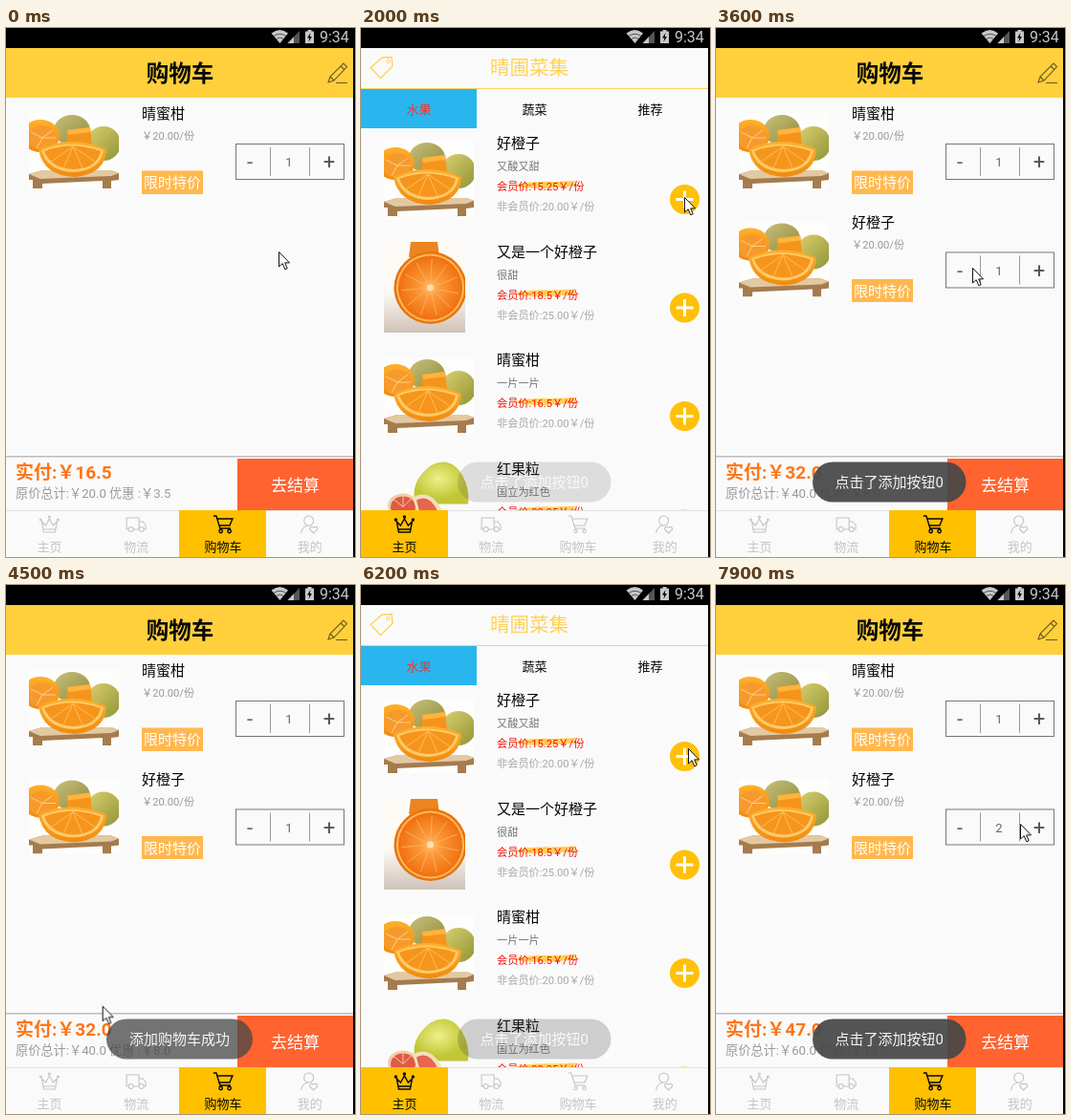
An HTML page for the animation above (8 s loop, 365 by 554 pixels).

```html
<!DOCTYPE html>
<html lang="zh-CN">
<head>
<meta charset="utf-8">
<title>购物车</title>
<style>
html, body { margin: 0; width: 100%; height: 100%; overflow: hidden; background: #000; }
svg { display: block; width: 365px; height: 554px; }
text { font-family: Roboto, "Noto Sans CJK SC", "Noto Sans CJK", sans-serif; white-space: pre; }

.step { animation: 8s step-end infinite; }
.home { animation-name: home; }
.cart { animation-name: cart; }
.tab-home { animation-name: tab-home; }
.tab-cart { animation-name: tab-cart; }
.sum1 { animation-name: sum1; }
.sum2 { animation-name: sum2; }
.sum3 { animation-name: sum3; }
.second { animation-name: second; }
@keyframes home { 0% { opacity: 0 } 12.4% { opacity: 1 } 39.9% { opacity: 0 } 63.65% { opacity: 1 } 91.15% { opacity: 0 } }
@keyframes cart { 0% { opacity: 1 } 12.4% { opacity: 0 } 39.9% { opacity: 1 } 63.65% { opacity: 0 } 91.15% { opacity: 1 } }
@keyframes tab-home { 0% { opacity: 0 } 12.4% { opacity: 1 } 38.65% { opacity: 0 } 63.65% { opacity: 1 } 89.9% { opacity: 0 } }
@keyframes tab-cart { 0% { opacity: 1 } 12.4% { opacity: 0 } 38.65% { opacity: 1 } 63.65% { opacity: 0 } 89.9% { opacity: 1 } }
@keyframes sum1 { 0% { opacity: 1 } 30% { opacity: 0 } }
@keyframes sum2 { 0% { opacity: 0 } 30% { opacity: 1 } 80% { opacity: 0 } }
@keyframes sum3 { 0% { opacity: 0 } 80% { opacity: 1 } }
@keyframes second { 0% { opacity: 0 } 30% { opacity: 1 } }

.toast { animation: 8s linear infinite; }
.clicked { animation-name: clicked; }
.added { animation-name: added; }
@keyframes clicked {
  0%, 24.2% { opacity: 0 } 28.9%, 49.9% { opacity: 1 } 52.5%, 76.2% { opacity: 0 } 81.2%, 100% { opacity: 1 }
}
@keyframes added { 0%, 53% { opacity: 0 } 57%, 73.8% { opacity: 1 } 76.2%, 100% { opacity: 0 } }

.cursor { animation: cursor 8s ease-in-out infinite; }
@keyframes cursor {
  0% { transform: translate(285px, 234px) }
  10%, 11.25% { transform: translate(50px, 526px) }
  22.5%, 25% { transform: translate(338px, 177px) }
  35% { transform: translate(236px, 518px) }
  36.25%, 37.5% { transform: translate(236px, 520px) }
  45% { transform: translate(268px, 251px) }
  48.75% { transform: translate(250px, 142px) }
  60%, 62.5% { transform: translate(56px, 530px) }
  63.75% { transform: translate(109px, 432px) }
  73.75%, 77.5% { transform: translate(342px, 171px) }
  85% { transform: translate(262px, 489px) }
  88.75%, 90% { transform: translate(237px, 527px) }
  96.25% { transform: translate(272px, 314px) }
  98.75%, 100% { transform: translate(318px, 250px) }
}
</style>
</head>
<body>
<svg id="stage" viewBox="0 0 365 554">
  <defs>
    <linearGradient id="pear" x2="1" y2="1">
      <stop stop-color="#c9c07a"/><stop offset="1" stop-color="#8d8a3c"/>
    </linearGradient>
    <linearGradient id="lime" x2="1" y2="1">
      <stop stop-color="#dcd070"/><stop offset="1" stop-color="#8f9436"/>
    </linearGradient>
    <linearGradient id="rind" x2="0" y2="1">
      <stop stop-color="#ffb02a"/><stop offset="1" stop-color="#f08a10"/>
    </linearGradient>
    <linearGradient id="shade" x2="0" y2="1">
      <stop offset=".55" stop-color="#fdfaf6"/><stop offset="1" stop-color="#cfc2b8"/>
    </linearGradient>
    <radialGradient id="flesh">
      <stop stop-color="#ffc36a"/><stop offset=".3" stop-color="#fb9a3c"/><stop offset="1" stop-color="#f0700f"/>
    </radialGradient>
    <radialGradient id="zest" cx=".45" cy=".4">
      <stop stop-color="#eef08a"/><stop offset="1" stop-color="#c0c634"/>
    </radialGradient>
    <clipPath id="box"><rect width="94" height="79"/></clipPath>
    <clipPath id="tall"><rect width="85" height="95"/></clipPath>
    <g id="wedge" clip-path="url(#box)">
      <rect width="94" height="79" fill="#fdfdfb"/>
      <ellipse cx="45" cy="18" rx="19" ry="16" fill="url(#pear)"/>
      <ellipse cx="78" cy="32" rx="18" ry="18" fill="url(#lime)"/>
      <ellipse cx="12" cy="24" rx="20" ry="17" fill="url(#rind)"/>
      <ellipse cx="14" cy="26" rx="15" ry="13" fill="#f79a2c"/>
      <path d="M14 26L2 20M14 26L25 18M14 26L8 37M14 26H28" stroke="#ffcf85"/>
      <path d="M40 18L64 15L66 34L40 36z" fill="#f5941c"/>
      <path d="M40 18L64 15L65 20L41 23z" fill="#ffb43c"/>
      <path d="M0 64L14 60H86L94 63V70L86 71V79H77V71L14 74V79H4V70H0z" fill="#a57c4e"/>
      <path d="M0 64L14 60H86L94 63L86 66L12 69z" fill="#e3c9a2"/>
      <path d="M10 38Q44 22 81 38Q80 64 48 67Q15 66 10 38z" fill="url(#rind)"/>
      <path d="M13 39Q44 26 78 39Q75 60 47 62Q19 61 13 39z" fill="#ffcb6a"/>
      <path d="M16 40Q44 29 75 40Q71 58 47 59Q23 58 16 40z" fill="#f6951c"/>
      <path d="M46 35L22 52M46 35L36 58M46 35L56 58M46 35L69 51" stroke="#ffbd58" fill="none"/>
    </g>
    <g id="pomelo">
      <path d="M60 28Q72 28 80 42Q88 56 86 72H31Q26 54 38 40Q48 28 60 28z" transform="translate(0 -27)" fill="url(#zest)"/>
      <ellipse cx="18" cy="47" rx="16" ry="13" fill="#f0cfa6"/>
      <ellipse cx="18" cy="48" rx="13" ry="11" fill="#e05a44"/>
      <path d="M28 38Q46 28 58 50L54 64H36z" fill="#f5e0bc"/>
      <path d="M32 41Q45 34 54 52L50 64H38z" fill="#e8654e"/>
      <path d="M18 48L8 40M18 48L27 39M18 48V36" stroke="#f7c9ae"/>
    </g>
    <path id="crown" d="M-8-3L-6 8H6L8-3L4 1L0-6L-4 1zM-6 5H6M-10-5a1 1 0 1 0 2 0a1 1 0 1 0-2 0M8-5a1 1 0 1 0 2 0a1 1 0 1 0-2 0M-1-8a1 1 0 1 0 2 0a1 1 0 1 0-2 0"/>
    <path id="truck" d="M-8 5H-10V-7H3V5H-3M3-3H7L10 1V5H8M-8 5a2.5 2.5 0 1 0 5 0a2.5 2.5 0 1 0-5 0M3 5a2.5 2.5 0 1 0 5 0a2.5 2.5 0 1 0-5 0"/>
    <path id="trolley" d="M-10-9H-7L-3 4H8M-6-6H10L7 1H-4M-4 7a1.7 1.7 0 1 0 3.4 0a1.7 1.7 0 1 0-3.4 0M5 7a1.7 1.7 0 1 0 3.4 0a1.7 1.7 0 1 0-3.4 0"/>
    <path id="person" d="M-6-4a5 5 0 1 0 10 0a5 5 0 1 0-10 0M-9 9Q-8 2-2 1M4 9L0 5Q0 1 4 3Q8 1 8 5z"/>
  </defs>
</svg>
<script>
const INK = '#080808', PALE = '#c4c4c4', PAPER = '#fafafa', AMBER = '#ffc107', GOLD = '#ffd257';
const ROW = 113.5;

const rect = (x, y, w, h, fill, more = '') =>
  `<rect x="${x}" y="${y}" width="${w}" height="${h}" fill="${fill}" ${more}/>`;
const text = (x, cy, size, str, fill = INK, more = '') =>
  `<text x="${x}" y="${Math.round(cy + size * 0.36)}" font-size="${size}" fill="${fill}" ${more}>${str}</text>`;
const mid = (x, cy, size, str, fill, more = '') =>
  text(x, cy, size, str, fill, `text-anchor="middle" ${more}`);
const line = (d, stroke, width = 1) =>
  `<path d="${d}" fill="none" stroke="${stroke}" stroke-width="${width}"/>`;
const group = (cls, body, more = '') => `<g class="${cls}" ${more}>${body}</g>`;
const at = (x, y, body) => `<g transform="translate(${x} ${y})">${body}</g>`;

function slice() {
  let rays = '';
  for (let i = 0; i < 11; i++) {
    const a = i * Math.PI / 5.5 + 0.2;
    rays += `M48.5 48L${(48.5 + 30 * Math.cos(a)).toFixed(1)} ${(48 + 30 * Math.sin(a)).toFixed(1)}`;
  }
  return `<g clip-path="url(#tall)">${rect(0, 0, 85, 95, 'url(#shade)')}
    <path d="M28 0H56L58 16H26z" fill="#ec8420"/>
    <circle cx="48.5" cy="48" r="38" fill="#e8740c"/><circle cx="48.5" cy="48" r="35.5" fill="#ffb85c"/>
    <circle cx="48.5" cy="48" r="33.5" fill="url(#flesh)"/>${line(rays, '#ffb05c', 0.9)}
    <circle cx="48.5" cy="48" r="3.5" fill="#ffe0ae"/></g>`;
}

const wedge = '<use href="#wedge"/>';

function product([name, note, price, full, photo], i) {
  return at(0, i * ROW, photo
    + text(142, 121, 15, name)
    + text(142, 145, 11.2, note, '#777')
    + '<path d="M158 165Q176 160 200 161L226 160L222 163L229 165L192 168Q172 168 158 165z" fill="#ffd056"/>'
    + text(142, 166, 11.2, `会员价:${price}￥/份`, '#f5100a')
    + text(142, 187, 11.2, `非会员价:${full}￥/份`, '#a8a8a8')
    + `<circle cx="338.5" cy="179.5" r="15.5" fill="${AMBER}"/>`
    + line('M329.5 179.5H347.5M338.5 170.5V188.5', '#fff', 3));
}

function homePage() {
  const goods = [
    ['好橙子', '又酸又甜', '15.25', '20.00', at(24, 118, wedge)],
    ['又是一个好橙子', '很甜', '18.5', '25.00', at(24, 110.5, slice())],
    ['晴蜜柑', '一片一片', '16.5', '20.00', at(24, 118, wedge)],
    ['红果粒', '国立为红色', '22.95', '30.00', at(26, 113, '<use href="#pomelo"/>')]
  ];
  return rect(0, 21, 363, 533, PAPER)
    + line('M10 41.5L22 31L32 30.5L33 40L20.5 52.5z', GOLD, 1.3)
    + `<circle cx="28.5" cy="35" r="1.8" fill="none" stroke="${GOLD}"/>`
    + mid(176, 42, 20.5, '晴圃菜集', GOLD)
    + rect(0, 63, 363, 1, GOLD)
    + rect(0, 64, 121, 41, '#29b6ee')
    + mid(60.5, 85, 13, '水果', '#f4362f')
    + mid(181.5, 85, 13, '蔬菜') + mid(302.5, 85, 13, '推荐')
    + goods.map(product).join('');
}

function cartRow(name, i, count) {
  return at(0, i * ROW, at(24, 89, wedge)
    + text(142, 90, 15, name)
    + text(142, 113, 11.2, '￥20.00/份', '#999')
    + rect(142, 149.5, 64, 24.5, '#ffb84f')
    + mid(174, 162, 15, '限时特价', '#fff')
    + rect(240.5, 121.5, 113, 37, 'none', 'stroke="#777"')
    + line('M276.5 125V155M317.5 125V155', '#999')
    + mid(255, 140, 22, '-', '#666') + mid(338, 140, 22, '+', '#555')
    + count);
}

const qty = n => mid(296, 140, 13, n, '#666');

function cartPage() {
  const sums = [['16.5', '20.0', '3.5'], ['32.0', '40.0', '8.0'], ['47.0', '60.0', '13.0']];
  return rect(0, 21, 363, 533, PAPER)
    + rect(0, 21, 363, 52, '#ffd03c')
    + mid(182, 48, 23.5, '购物车', INK, 'font-weight="700"')
    + line('M337 57L339 51L353 37L356.5 40.5L343 55zM339 51L343 55M350 40L354 43.5M345 57.5H357', '#6a5720', 1.1)
    + cartRow('晴蜜柑', 0, qty(1))
    + group('step second', cartRow('好橙子', 1,
        group('step sum2', qty(1)) + group('step sum3', qty(2))))
    + rect(0, 448, 363, 1.5, '#bdbdbd')
    + sums.map(([pay, full, off], i) => group(`step sum${i + 1}`,
        text(10, 465, 19, `实付:￥${pay}`, '#ff7416', 'font-weight="700"')
        + text(10, 487, 13.2, `原价总计:￥${full} 优惠 :￥${off}`, '#9a9a9a'))).join('')
    + rect(242, 451, 121, 54, '#ff632f')
    + mid(302.5, 479, 17, '去结算', '#fff');
}

const tabs = [['crown', '主页'], ['truck', '物流'], ['trolley', '购物车'], ['person', '我的']];

function tab(i, colour, weight) {
  const [icon, label] = tabs[i], x = 45.4 + i * 90.75;
  return `<use href="#${icon}" x="${x}" y="520" fill="none" stroke="${colour}" stroke-width="${weight}"/>`
    + mid(x, 543, 13, label, colour);
}

const active = (cls, i) =>
  group(`step ${cls}`, rect(Math.floor(i * 90.75), 505, 91, 49, '#ffc000') + tab(i, INK, 1.4));

const navBar = () => rect(0, 505, 363, 49, PAPER) + rect(0, 505, 363, 1, '#e2e2e2')
  + tabs.map((_, i) => tab(i, PALE, 1.1)).join('')
  + active('tab-home', 0) + active('tab-cart', 2);

const statusBar = () => rect(0, 0, 365, 21, '#000')
  + '<path d="M277.5 5.5Q286.5-1.5 295 5.5L286.5 16z" fill="#c8c8c8"/>'
  + line('M280 8.5Q286.5 4 293 8.5M282.5 11.5Q286.5 8.5 290.5 11.5', '#333', 0.8)
  + '<path d="M294.5 16L307 3V16z" fill="#555"/><path d="M294.5 16L301 9.2V16z" fill="#c8c8c8"/>'
  + '<path d="M313 3.5H315.5V2H319.5V3.5H322V16H313z" fill="#c8c8c8"/>'
  + '<path d="M318.5 5L315 10.5H317.3L316.5 14.5L320 9H317.8z" fill="#000"/>'
  + text(328, 9.5, 16, '9:34', '#c8c8c8');

const toast = (cls, x, w, str) => group(`toast ${cls}`,
  rect(x, 454.5, w, 42, '#484848', 'rx="21" fill-opacity=".93"') + mid(x + w / 2, 475.4, 15, str, '#f4f4f4'));

const cursor = '<path class="cursor" d="M.5.5V16L4.2 12.7L6.8 18.8L9.2 17.8L6.7 11.9H11.5z" fill="#fff" stroke="#111"/>';

document.getElementById('stage').insertAdjacentHTML('beforeend',
  group('step home', homePage()) + group('step cart', cartPage())
  + navBar() + statusBar() + rect(363, 0, 2, 554, '#000')
  + toast('clicked', 101, 160.5, '点击了添加按钮0')
  + toast('added', 105, 153, '添加购物车成功')
  + cursor);
</script>
</body>
</html>
```
